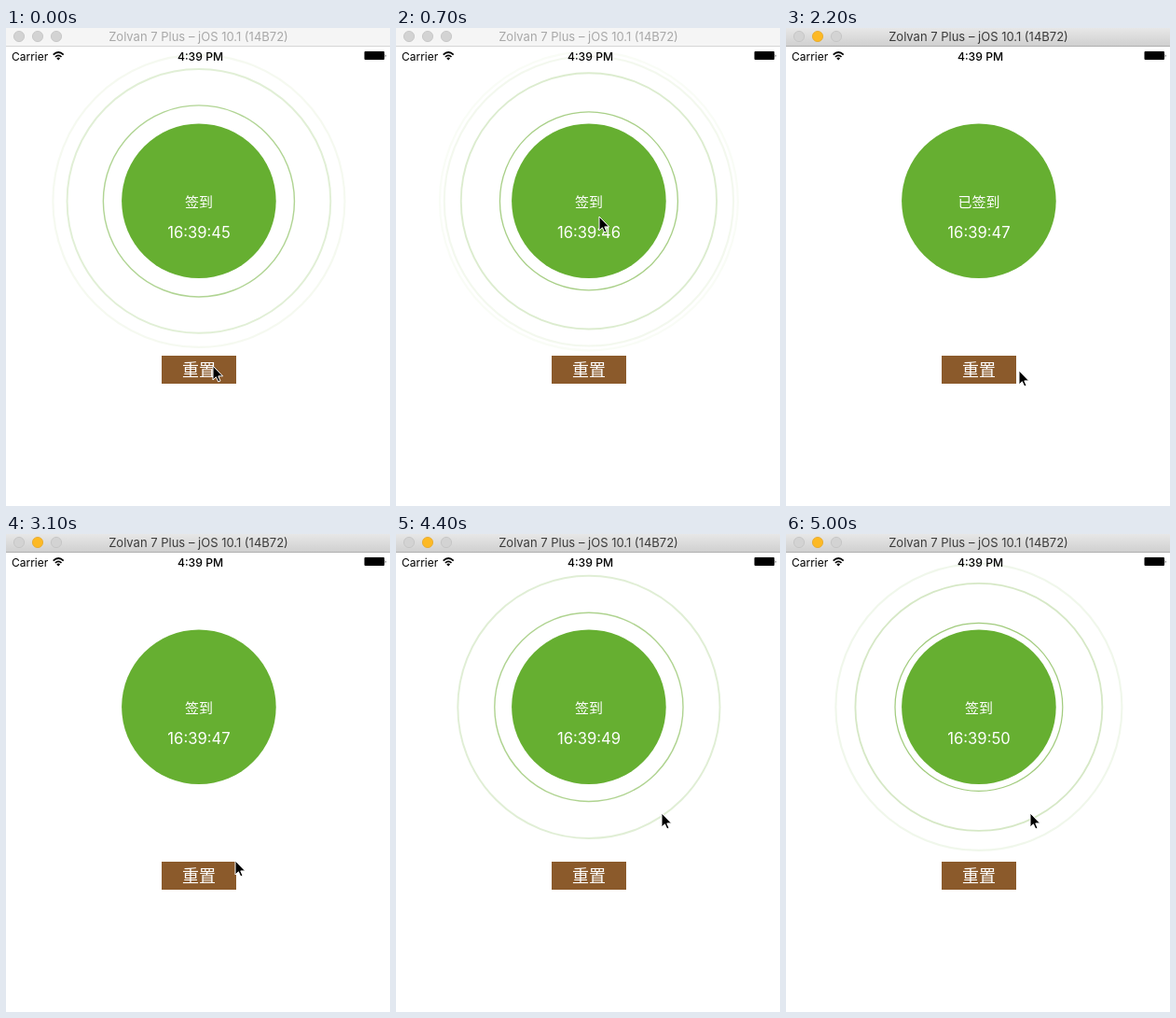
Recreate the animation shown at these times as an HTML page. Size 412x512 px, loop 5.1 s.

```html
<!DOCTYPE html>
<html lang="zh-CN">
<head>
<meta charset="utf-8">
<title>签到</title>
<style>
  html, body { margin: 0; width: 100%; height: 100%; overflow: hidden; background: #fff; }
  svg { display: block; width: 412px; height: 512px; }
  text { font-family: Inter, "Noto Sans CJK SC", "Noto Sans CJK", sans-serif; text-anchor: middle; }
  .white { fill: #fff; }
  .dot { fill: #d3d3d3; stroke: #c2c2c2; stroke-width: .8; }
  #title { fill: #a8a8a8; }
  .active #title { fill: #3a3a3a; }
  #bar { fill: #f5f5f5; }
  .active #bar { fill: url(#chrome); }
  #edge { fill: #d6d6d6; }
  .active #edge { fill: #b0b0b0; }
  .active #mid { fill: #fdb924; stroke: #e5a726; }
</style>
</head>
<body>
<svg id="stage" viewBox="0 0 412 512">
  <defs>
    <linearGradient id="chrome" x1="0" y1="0" x2="0" y2="1">
      <stop offset="0" stop-color="#e7e7e7"/>
      <stop offset="1" stop-color="#d0d0d0"/>
    </linearGradient>
  </defs>
  <g id="rings" fill="none" stroke="#6cae35"></g>

  <rect id="bar" width="412" height="19"/>
  <rect id="edge" y="19" width="412" height="1"/>
  <circle class="dot" cx="14" cy="9" r="5.6"/>
  <circle class="dot" id="mid" cx="34" cy="9" r="5.6"/>
  <circle class="dot" cx="54" cy="9" r="5.6"/>
  <text id="title" x="206.5" y="14" font-size="13">Zolvan 7 Plus – jOS 10.1 (14B72)</text>

  <text x="6" y="35" font-size="12" style="text-anchor:start">Carrier</text>
  <g fill="none" stroke="#000" stroke-width="1.7">
    <path d="M50.7 28.6Q56.2 23.4 61.7 28.6"/>
    <path d="M52.9 31Q56.2 27.9 59.5 31"/>
  </g>
  <path d="M54.3 32.4Q56.2 30.8 58.1 32.4L56.2 34.5Z"/>
  <text x="208.5" y="35" font-size="12.2" font-weight="500">4:39 PM</text>
  <rect x="384.5" y="25" width="21.5" height="9" rx="1"/>
  <path d="M406.8 28Q408.4 29.7 406.8 31.5Z"/>

  <circle cx="206.9" cy="185.3" r="82.8" fill="#66af31"/>
  <text id="label" class="white" x="207" y="191.5" font-size="15"></text>
  <text id="clock" class="white" x="207" y="225" font-size="16.6"></text>
  <rect x="167" y="351" width="80" height="30" fill="#8b5a2b"/>
  <text class="white" x="207" y="373" font-size="18">重置</text>

  <path id="cursor" d="M0 0V15L3.4 11.8L5.8 17L8 16L5.8 10.9H10.6Z" stroke="#fff"/>
</svg>
<script>
const LOOP = 5100, STEP = 100;
const R0 = 83, GROW = 77, LIFE = 3000, GAP = 830;
const ACTIVE = 1000, SIGNED = 1100, RESET = 3000, RESUME = 3200;
const PULSE_BEFORE = -2205, PULSE_AFTER = 3050;

// Pointer moves: begin, end, x, y
const home = [222, 362];
const moves = [
  [600, 700, 218, 202], [700, 1000, 211, 185], [1400, 1800, 250, 367],
  [3000, 3100, 246, 350], [3500, 3850, 285, 299], [4600, 5000, 262, 299]
];

const $ = id => document.getElementById(id);
const clamp = v => Math.min(1, Math.max(0, v));
const bezier = (a, b, s) => 3 * a * s * (1 - s) ** 2 + 3 * b * s * s * (1 - s) + s ** 3;

// cubic-bezier(.25, .1, .25, 1), solved by bisection
function ease(x) {
  let lo = 0, hi = 1;
  for (let i = 0; i < 20; i++) {
    const mid = (lo + hi) / 2;
    if (bezier(0.25, 0.25, mid) < x) lo = mid; else hi = mid;
  }
  return bezier(0.1, 1, lo);
}

const rings = Array.from({ length: Math.ceil(LIFE / GAP) }, () => {
  const el = document.createElementNS("http://www.w3.org/2000/svg", "circle");
  el.setAttribute("cx", 206.9);
  el.setAttribute("cy", 185.4);
  return $("rings").appendChild(el);
});

function drawRings(t, signed) {
  const elapsed = t - (t < SIGNED ? PULSE_BEFORE : PULSE_AFTER);
  rings.forEach((el, i) => {
    const age = elapsed % GAP + i * GAP;
    const p = ease(clamp(age / LIFE));
    const r = R0 + GROW * p;
    const shown = !signed && age <= elapsed && age < LIFE && r > R0 + 1;
    el.setAttribute("r", r);
    el.setAttribute("stroke-width", 1.15 * r / R0);
    el.setAttribute("opacity", shown ? 0.7 * (1 - 0.94 * p) : 0);
  });
}

function pointer(t) {
  return moves.reduce(([x, y], [from, to, nx, ny]) => {
    const k = clamp((t - from) / (to - from));
    return [x + (nx - x) * k, y + (ny - y) * k];
  }, home);
}

// The clock stalls until shortly after the reset
function second(t) {
  const s = 45 + Math.floor((t + 300) / 1000);
  return t < RESUME ? Math.min(s, 47) : s;
}

function draw(t) {
  const signed = t >= SIGNED && t < RESET;
  drawRings(t, signed);
  $("stage").classList.toggle("active", t >= ACTIVE);
  $("label").textContent = signed ? "已签到" : "签到";
  $("clock").textContent = "16:39:" + second(t);
  $("cursor").setAttribute("transform", `translate(${pointer(t)})`);
}

const start = performance.now();
function tick() {
  const t = (performance.now() - start) % LOOP;
  draw(Math.floor(t / STEP) * STEP);
  requestAnimationFrame(tick);
}
tick();
</script>
</body>
</html>
```
